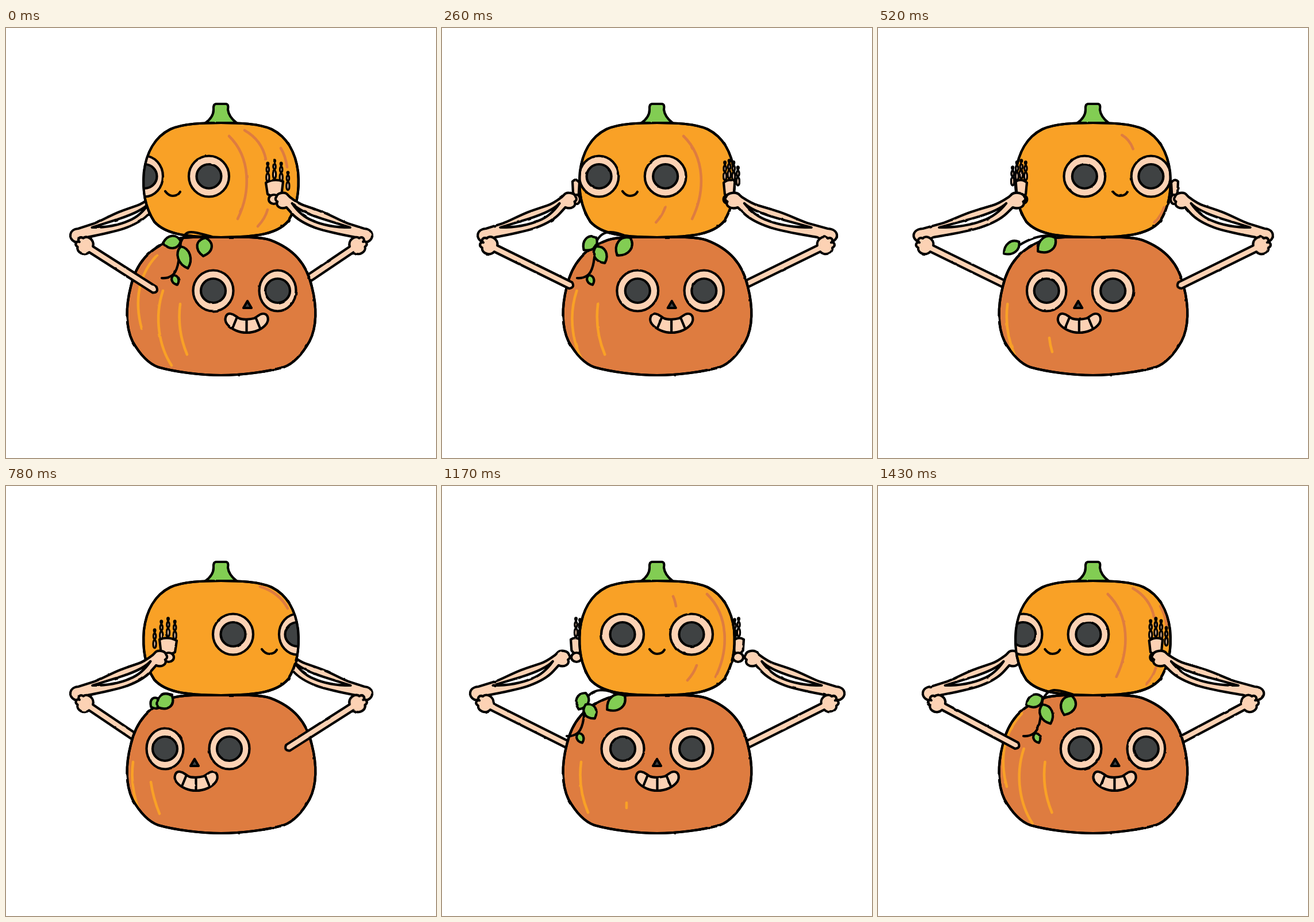
Animation of 748x748 px, one loop 1.56 s. Source, as an HTML page:

```html
<!DOCTYPE html>
<html lang="en">
<head>
<meta charset="utf-8">
<title>Pumpkin pair</title>
<style>
  html, body { margin: 0; width: 100%; height: 100%; overflow: hidden; background: #fff; }
  svg { display: block; width: 100vw; height: 100vh; }
  .ink { stroke: #000; stroke-width: 4.2; stroke-linecap: round; stroke-linejoin: round; vector-effect: non-scaling-stroke; }
  .thin { stroke-width: 3.2; }
  .stripe { fill: none; stroke-width: 4.6; stroke-linecap: round; }
</style>
</head>
<body>
<svg viewBox="0 0 748 748">
  <defs>
    <filter id="rough" x="0" y="0" width="748" height="748" filterUnits="userSpaceOnUse" color-interpolation-filters="sRGB">
      <feTurbulence type="fractalNoise" baseFrequency="0.07" numOctaves="1" seed="4"/>
      <feDisplacementMap in="SourceGraphic" scale="2.2" xChannelSelector="R" yChannelSelector="G"/>
    </filter>
    <clipPath id="near"><rect x="-80" y="-60" width="140" height="130"/></clipPath>
    <clipPath id="topClip"><path id="topShape"/></clipPath>
    <clipPath id="lowClip"><path id="lowShape"/></clipPath>
  </defs>
  <g id="poses" filter="url(#rough)"></g>
</svg>
<script>
const SKIN = '#fcd2b4', DARK = '#3f4243', GREEN = '#82cd53';
const AMBER = '#f9a126', RUST = '#de7c40';
const STEP = 130, SIDE = 3;

// Eased amounts for each step away from the middle pose.
const TURN = [0, 0.56, 0.84, 1];
const REACH = [0, 0.21, 0.46, 1];

const TOP_BODY = 'M374 165C405 165 440 166 462 176C490 190 504 218 508 250C511 285 506 312 490 337' +
  'C472 357 440 364 374 364C308 364 276 357 258 337C242 312 237 285 240 250C244 218 258 190 286 176C308 166 343 165 374 165Z';
const LOW_BODY = 'M374 364C400 364 440 362 460 369C500 384 523 410 532 450C541 485 541 520 528 545C515 568 500 584 483 590' +
  'C455 598 410 604 374 604C338 604 293 598 265 590C248 584 233 568 220 545C208 520 208 485 217 450C226 410 248 384 288 369C308 362 348 364 374 364Z';
const STEM = 'M361 142Q360 132 366 132H382Q388 132 386 142C387 151 392 158 401 165H347C357 158 361 151 361 142Z';
const FOREARM = 'M-10-6C-8-14 6-16 11-9L14-6C22 0 30 6 40 9C52 13 62 16 72 20C90 27 105 36 117 40L146 49C162 50 165 66 152 72' +
  'C143 73 138 69 130 64C110 60 80 55 58 47C42 41 26 32 17 22L8 12C-2 16-12 10-8 2C-12 0-12-4-10-6Z' +
  'M18 5C28 16 50 25 72 32L121 47C95 47 70 42 54 35C38 29 27 18 18 5Z';
const MOUTH = 'M-28-2C-36-3-40 8-34 16C-26 26-12 31 0 31C14 31 28 25 35 15C40 6 36-2 29-2' +
  'C22-2 20 3 13 6C6 8-6 9-13 6C-20 2-21-1-28-2Z';

const path = (d, fill = 'none', extra = '') => `<path class="ink" d="${d}" fill="${fill}" ${extra}/>`;
const oval = (x, y, rx, ry, fill, cls = '') =>
  `<ellipse class="ink ${cls}" cx="${x}" cy="${y}" rx="${rx}" ry="${ry}" fill="${fill}"/>`;
const group = (transform, body, extra = '') => `<g transform="${transform}" ${extra}>${body}</g>`;
const at = (x, y, body) => group(`translate(${x} ${y})`, body);
const mirror = body => group('translate(749 0) scale(-1 1)', body);
const stripes = (list, color) => `<path class="stripe" d="${list.join('')}" stroke="${color}"/>`;

// u runs from -1 to 1; the eased value keeps its sign.
const ease = (u, keys) => Math.sign(u) * keys[Math.round(Math.abs(u) * SIDE)];

// The eye that nears the rim narrows more than the other one.
function eyes(mid, y, drift) {
  const gap = 60 - 4 * Math.abs(drift);
  return [-1, 1].map(side => {
    const x = mid + side * gap;
    const rx = 37 - (side * drift > 0 ? 5 : 2) * Math.abs(drift);
    return oval(x, y, rx, 35.5, SKIN) + oval(x, y, 21.5, 21, DARK);
  }).join('');
}

function hand(u) {
  if (u > 0.5) return '';
  const x = 516 + 49 * Math.min(0, u);
  const w = u > 0 ? 6 : 9 + 6 * u * u;
  const count = u < 0 ? 4 : u > 0 ? 0 : 2;
  let out = '';
  for (let i = 0; i < count; i++) {
    const fx = x + w * 0.78 * (i - 1);
    const top = 230 + (2 - 3 * u) * (i - 1) ** 2, len = 31;
    out += path(`M${fx} ${top}v${len}`) + oval(fx, top + 1, 1.4, 2, '#000', 'thin') +
      oval(fx, top + len * 0.36, 2.2, 4.5, SKIN, 'thin') + oval(fx, top + len * 0.8, 2.6, 7, SKIN, 'thin');
  }
  out += path(`M${x - w} 269Q${x} 261 ${x + w} 267L${x + w * 0.85} 286Q${x} 297 ${x - w * 0.8} 289Z`, SKIN);
  return out + oval(x - 1, 298, Math.min(9, w), 8, SKIN);
}

// Right arm: in front of the top pumpkin when u < 0, behind it when u > 0.
function forearm(u, extra) {
  const reach = Math.abs(ease(u, REACH));
  const wrist = 538 - (u < 0 ? -58 * ease(u, TURN) : 55 * reach);
  const stretch = (699 - 63 * reach - wrist) / 159;
  return hand(u) + group(`translate(${wrist} 300) scale(${stretch} 1)`, path(FOREARM, SKIN, 'fill-rule="evenodd"'), extra);
}

function upperArm(u) {
  const x = 674 - 62 * u * u, y = 378;
  const [ex, ey] = u > 0 ? [540 - 52 * u, 445 + 12 * u] : [520, 455 + 15 * u];
  const len = Math.hypot(ex - x, ey - y);
  const turn = Math.atan2(ey - y, ex - x) * 180 / Math.PI;
  const bone = `M13-6H${len - 3}Q${len + 6} 0 ${len - 3} 6H13C10 17-6 18-9 9C-16 9-17 1-11 0C-17-1-16-9-9-9C-6-18 10-17 13-6Z`;
  return group(`translate(${x} ${y}) rotate(${turn})`, path(bone, SKIN));
}

const arm = u => forearm(u) + upperArm(u);
const nearArm = u => u < 0 ? forearm(u, 'clip-path="url(#near)"') : u > 0 ? upperArm(u) : '';

function leaf(x, y, angle, len, w) {
  const k = w * 1.3;
  return group(`translate(${x} ${y}) rotate(${angle})`,
    path(`M0 0C${len * 0.2} ${k} ${len * 0.7} ${k} ${len} 0C${len * 0.7} ${-k} ${len * 0.2} ${-k} 0 0Z`, GREEN));
}

function vine(u) {
  const far = 318 - 29 * u;
  const joint = u > 0 ? 234 + 34 * u : 250 - 54 * u;
  const big = leaf(far, 365, 142 + 45 * Math.min(0, u), 39 - 7 * u * u, 13);
  if (u > 0) {
    return path(`M${far} 363Q${far - 28} 356 ${joint} 378`) + leaf(joint, 372, 142, 40 - 20 * u, 10) + big;
  }
  const stem = `M${far - 14 - 25 * u} 363C${far - 30} 352 ${joint + 10} 350 ${joint} 373c-3 28-4 51-16 58q-8 5-17 4`;
  return path(stem) + leaf(joint, 360 - 11 * u, 113 - 62 * u, 31, 11) +
    leaf(joint, 380, 57 - 15 * u, 29 - 11 * u, 11) + big + leaf(joint - 13, 430, 67, 18, 6);
}

function lowPumpkin(u) {
  const t = ease(u, TURN);
  const lines = [
    `M${226 - 36 * u} 396c-32 34-39 79-26 127`,
    `M${215 - 58 * u} 457c-16 48-6 98 15 130`,
    `M${242 - 41 * t + 20 * t * t} 480q-6 45 12 88`
  ];
  if (u >= 0) lines.push(`M${321 - 69 * u} 551q${4 * u} ${5 + 23 * u} ${15 * u} ${9 + 46 * u}`.replace('551', 551 - 36 * u));
  return path(LOW_BODY, RUST) +
    `<g clip-path="url(#lowClip)">${stripes(lines, AMBER)}</g>` + path(LOW_BODY) +
    eyes(374.5 - 42 * t, 457, -t) +
    at(374 - 46 * t, 475, path('M0 0L-7 12H7Z', DARK)) +
    at(374.5 - 44 * t, 499, path(MOUTH, SKIN) + path('M-17 5L-24 22M0 9V30M16 5L23 22'));
}

function topPumpkin(u) {
  const t = ease(u, TURN);
  const rim = 500 + 85 * u;
  const lines = [
    `M${461 + 73 * t} 188c38 37 38 97 15 144`,
    `M${rim} 178q30 17 37 50M${rim + 40} 316q-4 15-17 29`,
    `M${517 + 39 * u} 209q8 13 11 33`
  ];
  if (u >= 0) lines.push(`M${402 + 40 * t} ${192 - 17 * u}q${3 + 30 * u} ${6 + 4 * u} ${5 + 43 * u} ${17 + 21 * u}`);
  if (Math.abs(u) < 0.5) lines.push(`M${443 + 164 * u} 312q-5 14-16 26`);
  return path(STEM, GREEN) + path(TOP_BODY, AMBER) +
    `<g clip-path="url(#topClip)">${stripes(lines, RUST)}${eyes(374 + 77 * t, 258, t)}</g>` + path(TOP_BODY) +
    at(374 + 84 * t, 288, path('M-13-4Q-7 4 0 4Q9 4 13-3'));
}

function drawPose(u) {
  return `<g display="none">${arm(u)}${mirror(arm(-u))}${lowPumpkin(u)}${topPumpkin(u)}` +
    `${vine(u)}${nearArm(u)}${mirror(nearArm(-u))}</g>`;
}

document.getElementById('topShape').setAttribute('d', TOP_BODY);
document.getElementById('lowShape').setAttribute('d', LOW_BODY);
const holder = document.getElementById('poses');
for (let i = -SIDE; i <= SIDE; i++) holder.innerHTML += drawPose(i / SIDE);
const groups = [...holder.children];
const cycle = 4 * SIDE;
let shown = -1;

// The pair swings from one side to the other and back again.
function show(time) {
  const step = Math.floor(time / STEP) % cycle;
  const pose = Math.min(step, cycle - step);
  if (pose === shown) return;
  groups.forEach((g, i) => g.setAttribute('display', i === pose ? 'inline' : 'none'));
  shown = pose;
}

const start = performance.now();
function tick() {
  show(Math.max(0, performance.now() - start));
  requestAnimationFrame(tick);
}
tick();
</script>
</body>
</html>
```
